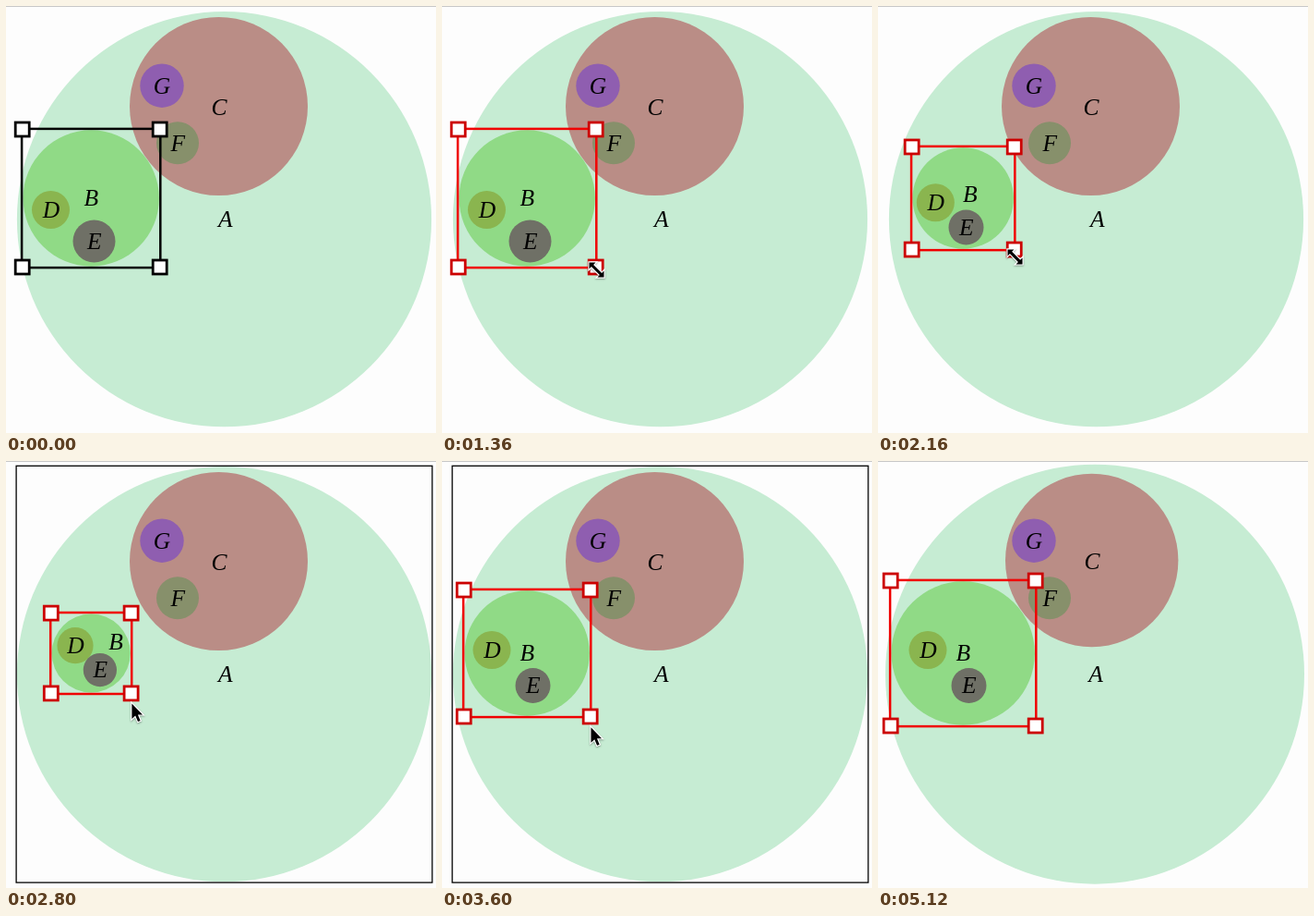
An HTML page with a canvas for the animation above (5.36 s loop, 466 by 462 pixels).

```html
<!DOCTYPE html>
<html lang="en">
<head>
<meta charset="utf-8">
<title>Nested circles</title>
<style>
  html, body { margin: 0; width: 100%; height: 100%; overflow: hidden; background: #fdfdfd; }
  canvas { display: block; }
</style>
</head>
<body>
<canvas id="stage" width="466" height="462"></canvas>
<script>
const ctx = document.getElementById('stage').getContext('2d');
const LOOP = 5360, STEP = 80;
const CENTER = { x: 92.2, y: 208 };
const START_HALF = 74.5, MIN_HALF = 43.4, END_HALF = 78.5;

const mix = (a, b, k) => a + (b - a) * k;
const ramp = (t, from, to) => Math.min(1, Math.max(0, (t - from) / (to - from)));
const within = (t, from, to) => t >= from && t < to;

// Moves p to the given distance from q, along the line between them
function setDistance(p, q, distance) {
  const dx = p.x - q.x, dy = p.y - q.y, k = distance / Math.hypot(dx, dy);
  p.x = q.x + dx * k;
  p.y = q.y + dy * k;
}
const distance = (p, q) => Math.hypot(p.x - q.x, p.y - q.y);

// D and E stay inside B without overlapping; the label of B keeps clear of both
function layout(half, shrink, radiusE) {
  const settled = shrink * shrink;
  const squeeze = Math.min(1, half / 45.5);
  const d = { x: mix(48.5, 54, settled), y: mix(220.5, 204.5, settled), r: 20.5 * squeeze };
  const e = { x: mix(95.5, 98.5, settled), y: mix(254.5, 243, settled), r: radiusE * squeeze };
  const label = { x: 92, y: 208 };
  for (let i = 0; i < 30; i++) {
    for (const c of [d, e]) {
      const reach = half - 4.8 - c.r;
      if (distance(c, CENTER) > reach) setDistance(c, CENTER, reach);
    }
    const overlap = d.r + e.r - distance(d, e);
    if (overlap > 0) {
      setDistance(d, e, d.r + e.r - overlap / 2);
      setDistance(e, d, d.r + e.r);
    }
  }
  for (let i = 0; i < 30; i++) {
    for (const c of [d, e]) {
      if (distance(label, c) < c.r + 16.7) setDistance(label, c, c.r + 16.7);
    }
  }
  return { d, e, label };
}

function disc(x, y, r, color) {
  ctx.fillStyle = color;
  ctx.beginPath();
  ctx.arc(x, y, r, 0, 2 * Math.PI);
  ctx.fill();
}

function write(text, x, y) {
  ctx.fillStyle = '#000';
  ctx.fillText(text, x + 0.4, y + 8.4);
}

function frame(x, y, half, color, width) {
  ctx.strokeStyle = color;
  ctx.lineWidth = width;
  ctx.strokeRect(x - half, y - half, 2 * half, 2 * half);
}

function selection(half, active) {
  const { x, y } = CENTER;
  frame(x, y, half + 0.6, active ? '#f00000' : '#000', 2.5);
  ctx.fillStyle = '#fff';
  for (const sx of [-1, 1]) for (const sy of [-1, 1]) {
    const hx = x + sx * half, hy = y + sy * half;
    ctx.fillRect(hx - 7.5, hy - 7.5, 15, 15);
    frame(hx, hy, 7.5, active ? '#cc0000' : '#000', 2.8);
  }
}

const arrow = new Path2D('M0 0V16.5L3.8 13L6.6 19.6L9.2 18.5L6.5 12H11.6Z');
const resize = new Path2D('M-8 -8H-1L-3.4 -5.6L5.6 3.4L8 1V8H1L3.4 5.6L-5.6 -3.4L-8 -1Z');

function drawCursor(x, y, shape) {
  ctx.save();
  ctx.translate(x, y);
  ctx.shadowColor = 'rgba(0, 0, 0, 0.35)';
  ctx.shadowBlur = 2;
  ctx.shadowOffsetY = 1;
  ctx.strokeStyle = '#fff';
  ctx.lineWidth = 2.4;
  ctx.stroke(shape);
  ctx.shadowColor = 'transparent';
  ctx.fillStyle = '#000';
  ctx.fill(shape);
  ctx.restore();
}

function draw(t) {
  const approach = ramp(t, 400, 824);
  const shrink = ramp(t, 1550, 2550);
  const grow = ramp(t, 3000, 3840);
  const half = mix(mix(START_HALF, MIN_HALF, shrink), END_HALF, grow);
  const { d, e, label } = layout(half, shrink, mix(23, 19, ramp(t, 1550, 1760)));

  // B pushes C smaller and A larger once it outgrows its first size
  const push = Math.max(0, (half - START_HALF) / (END_HALF - START_HALF));
  const ax = mix(236.5, 235, push), ay = 230.7, ar = mix(224.6, 227, push);
  const cx = mix(230.5, 231.7, push), cy = mix(108.5, 107.5, push);

  ctx.fillStyle = '#fdfdfd';
  ctx.fillRect(0, 0, 466, 462);
  ctx.fillStyle = '#c8c8c8';
  ctx.fillRect(0, 0, 466, 1);

  disc(ax, ay, ar, '#c6ecd3');
  disc(CENTER.x, CENTER.y, half - 0.8, '#90da86');
  disc(cx, cy, mix(96.5, 93.7, push), '#ba8d86');
  disc(d.x, d.y, d.r, '#8ab54f');
  disc(e.x, e.y, e.r, '#6f7066');
  disc(186, 148.3, 23, '#87906b');
  disc(169, 86.2, 23.7, '#8f5eb0');

  ctx.font = 'italic 25.5px "Liberation Serif", serif';
  ctx.textAlign = 'center';
  write('A', mix(237.5, 235.7, push), 231);
  write('B', label.x, label.y);
  write('C', cx, cy + 1);
  write('D', d.x, d.y);
  write('E', e.x, e.y);
  write('F', 186, 148.8);
  write('G', 168.5, 86.8);

  const hoverA = within(t, 400, 960) || within(t, 2240, 3760);
  if (hoverA) frame(ax, ay, ar + 0.8, '#000', 1.3);
  selection(half, t >= 1280);

  if (within(t, 400, 4400)) {
    // The pointer drifts below the corner it drags
    const lag = 3 + 8 * shrink + grow * (9.5 - 12 * grow);
    const x = CENTER.x + half + 0.8 + 150 * (1 - approach);
    const y = CENTER.y + half + lag + 115 * (1 - approach);
    const overHandle = within(t, 720, 2240) || t >= 3760;
    drawCursor(x, y, overHandle ? resize : arrow);
  }
}

const start = performance.now();
function tick() {
  const t = (performance.now() - start) % LOOP;
  draw(Math.floor(t / STEP) * STEP);
  requestAnimationFrame(tick);
}
tick();
</script>
</body>
</html>
```
